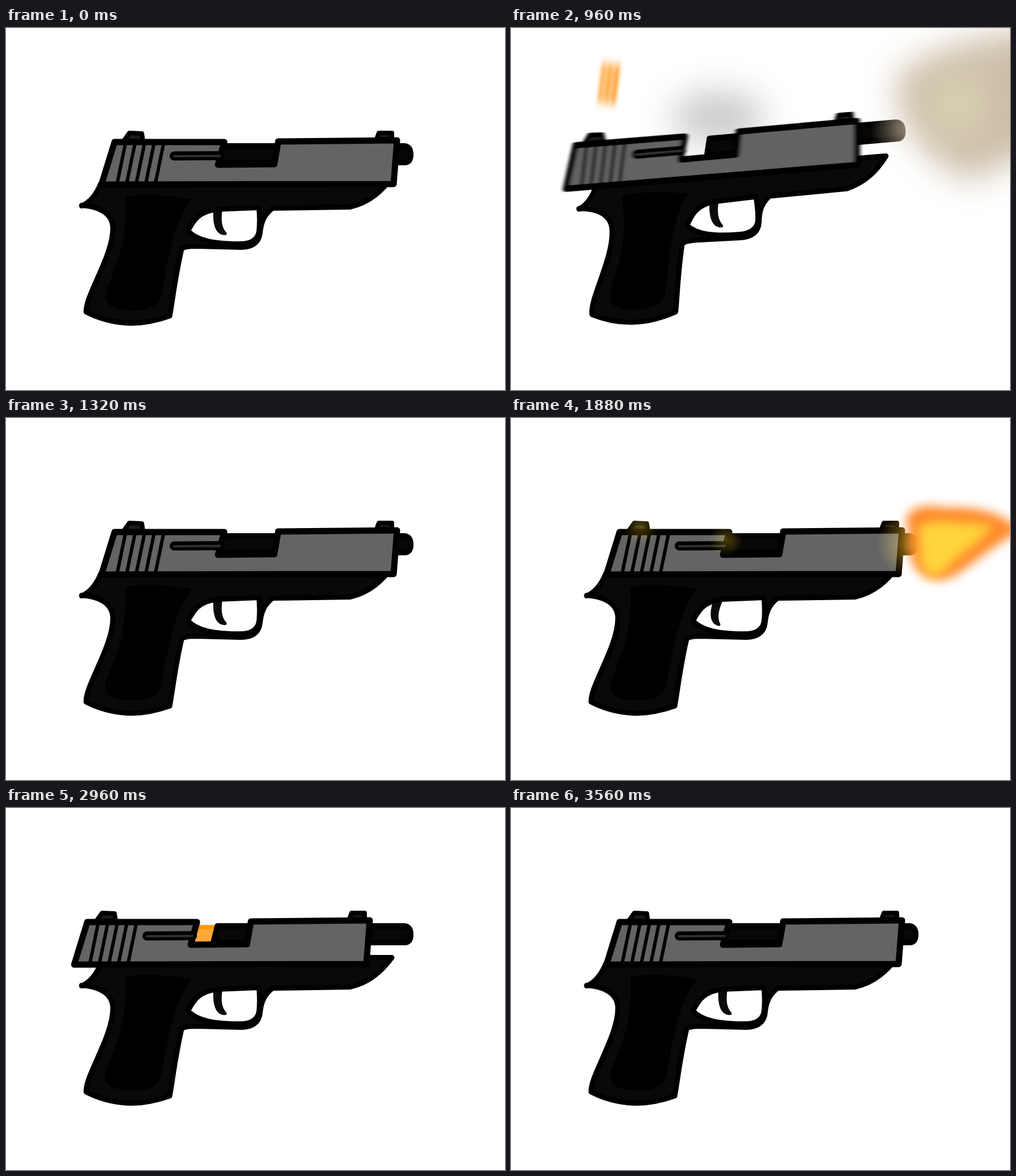
These frames come from a looping animation (878 px wide and 638 px high, 3.84 s). An HTML page:

```html
<!DOCTYPE html>
<html lang="en">
<head>
<meta charset="utf-8">
<title>Pistol animation</title>
<style>
  html, body { margin: 0; width: 100%; height: 100%; overflow: hidden; background: #fff; }
  svg { display: block; width: 878px; height: 638px; }
  .line { stroke: #000; stroke-linejoin: round; stroke-linecap: round; }
  #glow { mix-blend-mode: screen; }
  .b9 { filter: blur(9px); }
  .b14 { filter: blur(14px); }
  .b30 { filter: blur(30px); }
</style>
</head>
<body>
<svg viewBox="0 0 878 638">
  <defs>
    <radialGradient id="hot"><stop stop-color="#a57a18"/><stop offset="1" stop-color="#000"/></radialGradient>
    <radialGradient id="lit"><stop stop-color="#493c06"/><stop offset="1" stop-color="#000"/></radialGradient>
    <radialGradient id="tan"><stop stop-color="#7d6f60"/><stop offset="1" stop-color="#000"/></radialGradient>
    <filter id="slideBlur" x="-10%" y="-10%" width="120%" height="120%"><feGaussianBlur stdDeviation="0"/></filter>
    <filter id="shellBlur" x="-60%" y="-60%" width="220%" height="220%"><feGaussianBlur stdDeviation="8 3"/></filter>
    <g id="case">
      <rect x="-35" y="-16" width="70" height="32" rx="2" fill="#ffa73a"/>
      <path d="M-35-15H35v7C10-11-10-6-35-8Z" fill="#ff9800"/>
    </g>
  </defs>
  <rect width="878" height="638" fill="#fff"/>
  <ellipse id="haze" class="b30" cx="365" cy="158" rx="82" ry="48" fill="#8d8d90"/>

  <g id="gun">
    <use id="chambered" href="#case" x="356" y="222"/>
    <path id="barrel" class="line" d="M372 208H700Q712 208 712 223T700 237H365Z" fill="#070707" stroke-width="10"/>
    <path id="trigger" d="M365 318C363 345 368 364 384 365Q390 365 388 361C379 351 378 338 381 318Z" fill="#0b0b0b"/>
    <path class="line" transform="translate(-1 1.6)" fill="#090909" fill-rule="evenodd" stroke-width="9" d="M134 312C150 305 160 292 168 272L640 262H680C663 285 641 306 606 314L470 316C455 328 450 340 448 360C446 378 432 385 415 385L335 383C322 383 313 385 310 388C298 440 294 480 289 506C240 524 190 523 142 499C140 470 190 400 189 350C188 325 165 313 134 311Z
      M321 356C330 340 338 322 372 318L446 315C448 335 447 350 446 358C443 374 428 379 412 379C365 379 338 373 321 356Z"/>
    <path d="M210 298C240 290 290 295 327 302C296 340 287 400 274 465C270 494 248 498 222 498C190 498 170 488 175 468C186 430 215 390 210 298Z"/>
    <g id="slide">
      <path class="line" d="M207 199L217 185 239 186 241 199Z M652 196L656 185H679V196Z" fill="#1a1a1a" stroke-width="8"/>
      <path class="line" d="M191 201L384 201 373 241 472 240 479 200 688 198 682 275 168 276Z" fill="#646464" stroke-width="11"/>
      <path id="ribs" stroke="#000" stroke-width="6"/>
      <path class="line" d="M296 225.500L376 225" stroke-width="16"/>
      <path d="M296 226L376 225.500" stroke="#303030" stroke-width="4" stroke-linecap="round"/>
    </g>
  </g>

  <g id="glow">
    <g id="fireGlow">
      <circle cx="708" cy="220" r="64" fill="url(#hot)"/>
      <circle cx="378" cy="214" r="30" fill="url(#lit)"/>
      <circle cx="228" cy="190" r="34" fill="url(#lit)"/>
    </g>
    <circle id="smokeGlow" cx="720" cy="222" r="64" fill="url(#tan)"/>
  </g>

  <g id="flash">
    <path class="b9" fill="#ff8b2c" d="M694 180C705 153 730 152 765 158C815 156 860 163 897 198C850 225 815 255 790 272C755 297 722 286 706 255C697 230 705 200 694 180Z"/>
    <path class="b9" fill="#ffd43c" d="M716 195C732 175 770 185 847 188C832 215 800 232 775 255C757 282 735 285 724 262C716 240 724 215 716 195Z"/>
  </g>

  <g id="jet">
    <path class="b14" fill="#b8a48c" d="M640 115C690 98 800 96 920 82V118C870 150 810 185 745 188C700 180 675 150 640 115Z"/>
    <path class="b9" fill="#d9d0b2" d="M700 122C760 112 820 120 880 108C840 135 790 170 745 172C715 168 705 145 700 122Z"/>
  </g>
  <g id="cloud">
    <path class="b30" fill="#bfae94" d="M680 85C730 40 840 10 940 0V225C860 215 835 285 790 262C740 230 670 170 680 85Z"/>
    <ellipse class="b30" cx="785" cy="135" rx="55" ry="65" fill="#cfc39f"/>
  </g>

  <g id="shell">
    <use href="#case"/>
    <path id="streaks" d="M-35-6H35M-35 7H35" stroke="#ffe0b0" stroke-width="5"/>
    <path id="nose" d="M33-14C47-13 53-6 53 0S47 13 33 14Z" fill="#ff9d26"/>
  </g>
</svg>
<script>
const $ = id => document.getElementById(id);
const STEP = 40, LOOP = 3840;
const SHOTS = [21, 27, 47], RACK = 74;

// One entry per step after the trigger breaks.
const shot = {
  shift: [0, -55, -110, -55, 0, 0],
  angle: [0, -3.8, -7.6, -4.6, -2.2, -0.7],
  trigger: [16, 12, 9, 4, 0, 0],
  blur: [0, 6, 6, 3, 0, 0],
  flash: [1, 0.75, 0, 0, 0, 0],
  jet: [0, 0.25, 0.9, 0, 0, 0],
  cloud: [0, 0, 0, 0.8, 0.4, 0.14],
  haze: [0, 0, 0, 0.45, 0.22, 0.08],
  smokeGlow: [0, 0, 1, 1, 0.35, 0.1]
};
const rackShift = [-48, -109, -109, -55];

$('ribs').setAttribute('d',
  [0, 1, 2, 3, 4].map(i => `M${210 + i * 16.8} 204l-14 68`).join(''));

const move = (id, value) => $(id).setAttribute('transform', value);
function fade(id, alpha) {
  $(id).style.display = alpha ? '' : 'none';
  $(id).style.opacity = alpha;
}

function placeShell(k, r) {
  const fired = k === 2 || k === 3 || k === 4;
  const racked = r >= 1 && r <= 14;
  fade('shell', fired || racked ? 1 : 0);
  fade('nose', racked ? 1 : 0);
  fade('streaks', fired ? 0.8 : 0);
  fade('chambered', fired || racked ? 0 : 1);
  $('shell').setAttribute('filter', fired ? 'url(#shellBlur)' : 'none');
  if (fired) {
    const m = k - 2;
    move('shell', `translate(${286 - 114 * m} ${158 - 60 * m}) rotate(${10 + 87 * m})`);
  } else if (racked) {
    const m = r - 1;
    move('shell', `translate(${345 - 10 * m} ${220 - 58.3 * m + 7.08 * m * m}) rotate(${24.8 * m})`);
  }
}

function draw(time) {
  const n = Math.floor(time % LOOP / STEP);
  const start = SHOTS.find(s => n >= s && n < s + 6);
  const k = start === undefined ? -1 : n - start;
  const r = n - RACK;
  const at = key => k < 0 ? 0 : shot[key][k];

  const turn = `rotate(${at('angle')} 196 483)`;
  for (const id of ['gun', 'glow', 'flash']) move(id, turn);
  move('slide', `translate(${at('shift') || rackShift[r] || 0})`);
  move('barrel', `rotate(${at('angle') * 0.08} 365 222)`);
  move('trigger', `rotate(${at('trigger')} 370 292)`);

  const blur = at('blur');
  $('slide').setAttribute('filter', blur ? 'url(#slideBlur)' : 'none');
  $('slideBlur').firstElementChild.setAttribute('stdDeviation', `${blur} ${blur / 8}`);

  for (const id of ['flash', 'jet', 'cloud', 'haze', 'smokeGlow']) fade(id, at(id));
  fade('fireGlow', at('flash'));
  placeShell(k, r);
}

function loop() {
  draw(performance.now());
  requestAnimationFrame(loop);
}
loop();
</script>
</body>
</html>
```
